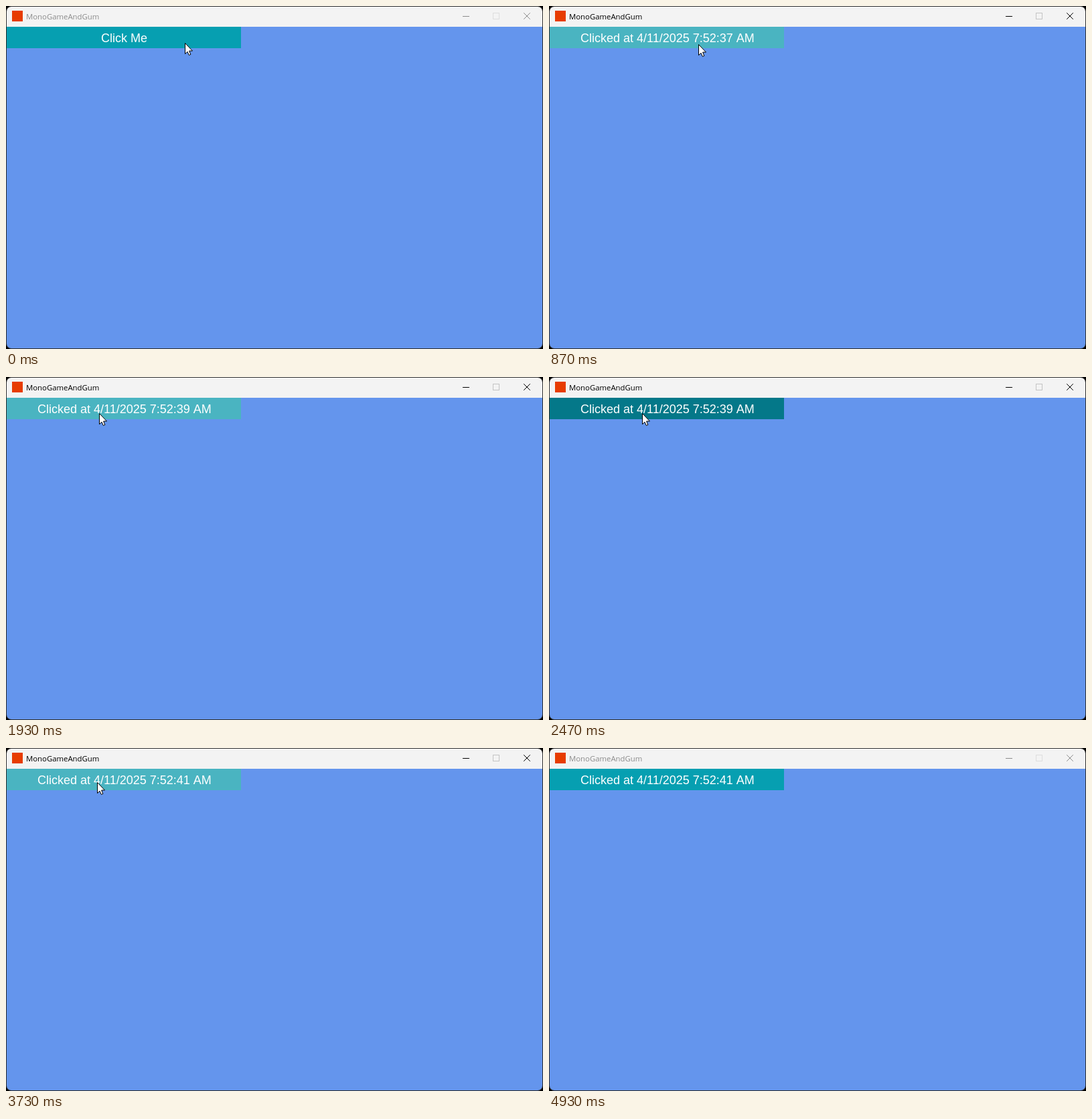
An HTML page with a canvas that plays this animation: 802 px wide and 512 px high, repeating every 5.4 s.

```html
<!DOCTYPE html>
<html lang="en">
<head>
<meta charset="utf-8">
<title>MonoGameAndGum</title>
<style>
html, body { margin: 0; width: 100%; height: 100%; overflow: hidden; background: #000; }
canvas { display: block; }
</style>
</head>
<body>
<canvas id="stage" width="802" height="512"></canvas>
<script>
const ctx = document.getElementById('stage').getContext('2d');
const LOOP = 5400;
const FPS = 15;
const BUTTON = { x: 1, y: 31, w: 350, h: 32 };
const COLORS = { normal: '#069fb1', hover: '#4ab4c1', pushed: '#047889' };

// Ticks at which the button is let go, and how long it is held
const RELEASES = [5, 29, 40, 56];
const HOLD = 3;
const CLOCK = 37.5; // seconds on the clock at tick 0

const easeOut = t => 1 - (1 - t) ** 2;
const easeIn = t => t ** 1.3;

// The pointer rests between moves
const REST = { x: 267, y: 55 };
const MOVES = [
  { from: 12, to: 13, x: 223, y: 57, ease: easeOut },
  { from: 13, to: 17, x: 154, y: 178, ease: easeOut },
  { from: 17, to: 22, x: 135, y: 63, ease: easeOut },
  { from: 22, to: 24, x: 139, y: 54, ease: easeOut },
  { from: 47, to: 48, x: 139, y: 53, ease: easeOut },
  { from: 48, to: 50, x: 136, y: 51, ease: easeOut },
  { from: 61, to: 69, x: 140, y: 555, ease: easeIn }
];

// Ticks start on times rounded to 10 ms
const tickStart = n => Math.round(n * 100 / FPS) * 10;

function tickAt(time) {
  let n = Math.floor(time * FPS / 1000) + 1;
  while (tickStart(n) > time) n--;
  return n;
}

function pointerAt(tick) {
  let { x, y } = REST;
  for (const m of MOVES) {
    if (tick <= m.from) break;
    const k = m.ease(Math.min(1, (tick - m.from) / (m.to - m.from)));
    x += (m.x - x) * k;
    y += (m.y - y) * k;
  }
  return { x: Math.round(x), y: Math.round(y) };
}

function labelAt(tick) {
  const last = RELEASES.filter(r => r <= tick).pop();
  if (!last) return 'Click Me';
  return `Clicked at 4/11/2025 7:52:${Math.floor(CLOCK + last / FPS)} AM`;
}

function line(color, x0, y0, x1, y1) {
  ctx.strokeStyle = color;
  ctx.beginPath();
  ctx.moveTo(x0, y0);
  ctx.lineTo(x1, y1);
  ctx.stroke();
}

function drawTitleBar(active) {
  const ink = active ? '#000' : '#8c8c8c';
  ctx.fillStyle = '#f3f3f3';
  ctx.fillRect(1, 1, 800, 30);
  ctx.fillStyle = '#e73c00';
  ctx.fillRect(9, 7, 16, 16);
  ctx.font = '11.35px "Open Sans", sans-serif';
  ctx.fillStyle = ink;
  ctx.fillText('MonoGameAndGum', 30, 20);
  line(ink, 682, 15.5, 692, 15.5);
  ctx.strokeStyle = active ? '#c4c4c4' : '#dedede';
  ctx.strokeRect(727.5, 10.5, 9, 9);
  line(ink, 773.2, 10.2, 782.8, 19.8);
  line(ink, 782.8, 10.2, 773.2, 19.8);
}

function drawButton(tick, active, pointer) {
  const { x, y, w, h } = BUTTON;
  const over = active && pointer.y < y + h;
  const held = RELEASES.some(r => tick >= r - HOLD && tick < r);
  ctx.fillStyle = COLORS[held ? 'pushed' : over ? 'hover' : 'normal'];
  ctx.fillRect(x, y, w, h);

  const label = labelAt(tick);
  ctx.font = '18px "Liberation Sans", Arial, sans-serif';
  ctx.fillStyle = '#fff';
  const left = x + (w + 1 - ctx.measureText(label).width) / 2;
  ctx.fillText(label, Math.round(left), 54);
}

function drawPointer({ x, y }) {
  ctx.save();
  ctx.translate(x, y);
  const arrow = new Path2D('M.5 .5V16.5L4 13.2L6.3 18.4L8.8 17.4L6.6 12H11.5Z');
  ctx.fillStyle = '#fff';
  ctx.fill(arrow);
  ctx.strokeStyle = '#000';
  ctx.stroke(arrow);
  ctx.restore();
}

function draw(time) {
  const tick = tickAt(time);
  const active = tick >= 1 && tick < 74;
  const pointer = pointerAt(tick);
  ctx.fillStyle = '#000';
  ctx.fillRect(0, 0, 802, 512);
  ctx.fillStyle = '#303030';
  ctx.beginPath();
  ctx.roundRect(0, 0, 802, 512, 8);
  ctx.fill();

  ctx.save();
  ctx.beginPath();
  ctx.roundRect(1, 1, 800, 510, 7);
  ctx.clip();
  ctx.fillStyle = '#6495ed';
  ctx.fillRect(1, 31, 800, 480);
  drawTitleBar(active);
  drawButton(tick, active, pointer);
  drawPointer(pointer);
  ctx.restore();
}

const start = performance.now();

function frame() {
  draw((performance.now() - start) % LOOP);
  requestAnimationFrame(frame);
}
frame();
</script>
</body>
</html>
```
